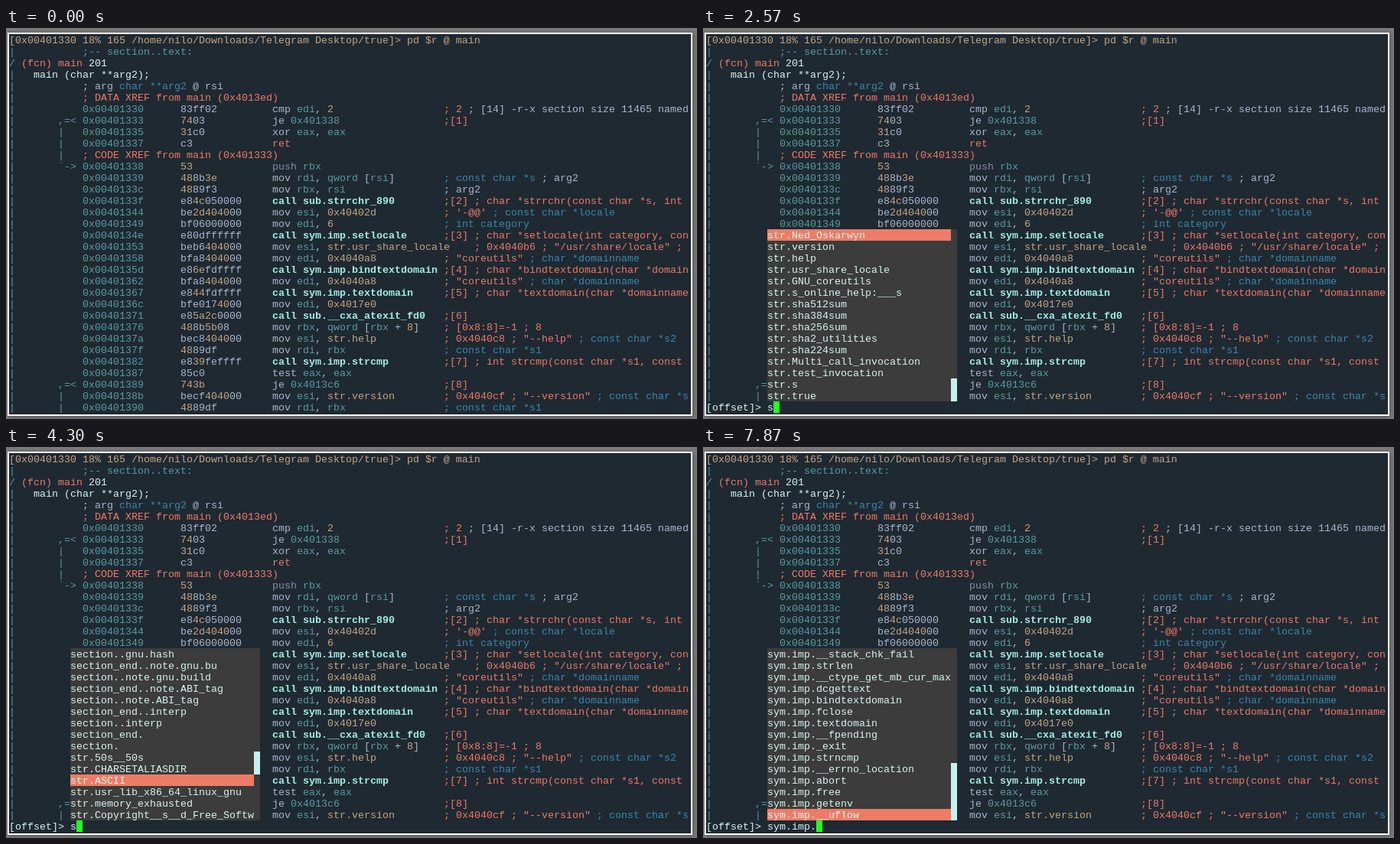
These frames come from a looping animation (903x511 px, 8000 ms). An HTML page with a canvas:

```html
<!DOCTYPE html>
<html lang="en">
<head>
<meta charset="utf-8">
<title>Disassembly with flag completion</title>
<style>
  html, body { margin: 0; width: 100%; height: 100%; overflow: hidden; background: #7b7b7b; }
  canvas { display: block; }
</style>
</head>
<body>
<canvas id="stage" width="903" height="511"></canvas>
<script>
const ctx = document.getElementById('stage').getContext('2d');
const LOOP = 8000, CELL = 8, LINE = 15, LEFT = 4, TOP = 8;
const FONT = '13.333px "Liberation Mono", monospace';
const BG = '#1f2932', POPUP = '#3c3c3c', SELECTED = '#ed7c66', PALE = '#c8f0ea';
const COLORS = {
  w: '#d8f6ef', g: '#a9b7cd', t: '#559c9e', r: '#ed7a66', b: '#3a87ad',
  n: '#c5a582', p: '#8a8aa6', c: '#a2eee2'
};
const colX = col => LEFT + col * CELL;
const rowY = row => TOP + row * LINE;

function fill(color, x, y, w, h) {
  ctx.fillStyle = color;
  ctx.fillRect(x, y, w, h);
}

// "^x" inside a string switches to colour x.
function write(col, row, text) {
  for (const part of text.split('^').slice(1)) {
    const run = part.slice(1);
    ctx.font = (part[0] === 'c' ? 'bold ' : '') + FONT;
    ctx.fillStyle = COLORS[part[0]];
    ctx.fillText(run, colX(col), rowY(row) + 12);
    col += run.length;
  }
}

const paintBytes = hex => hex.replace(/../g, b => {
  const v = parseInt(b, 16);
  return (v > 31 && v < 127 ? '^n' : '^g') + b;
});

function paintCode(code) {
  if (code.startsWith('call')) return '^c' + code;
  if (code === 'ret') return '^r' + code;
  const [op, ...args] = code.split(' ');
  const rest = args.join(' ');
  if (op === 'je') return '^g' + op + ' ^t' + rest;
  return (op === 'push' ? '^p' : '^g') + op + ' ' +
    rest.replace(/str\.\w+|0x\w+|\b\d+\b|[a-z]+|[^a-z0-9]+/g,
      m => (/^(str\.|\d)/.test(m) ? '^n' : /^[a-z]/.test(m) ? '^t' : '^g') + m);
}

const HEADER = [
  [0, '^n[0x00401330 18% 165 /home/nilo/Downloads/Telegram Desktop/true]> pd $r @ main'],
  [12, '^t;-- section..text:'],
  [2, '^r(fcn) main ^w201'],
  [4, '^wmain (char **arg2);'],
  [12, '^g; arg ^bchar **arg2 ^g@ rsi'],
  [12, '^r; DATA XREF from main (0x4013ed)']
];

// address | bytes | instruction | comment | jump gutter
const CODE = `
330|83ff02|cmp edi, 2|^r; 2 ^g; [14] -r-x section size 11465 named
333|7403|je 0x401338|^r;[1]|,=<
335|31c0|xor eax, eax||!
337|c3|ret||!
XREF
338|53|push rbx||\`->
339|488b3e|mov rdi, qword [rsi]|^b; const char *s ^g; arg2
33c|4889f3|mov rbx, rsi|^g; arg2
33f|e84c050000|call sub.strrchr_890|^r;[2] ; char *strrchr(const char *s, int
344|be2d404000|mov esi, 0x40402d|^r; '-@@' ^b; const char *locale
349|bf06000000|mov edi, 6|^b; int category
34e|e80dffffff|call sym.imp.setlocale|^r;[3] ; char *setlocale(int category, con
353|beb6404000|mov esi, str.usr_share_locale|^r     ; 0x4040b6 ; "/usr/share/locale" ;
358|bfa8404000|mov edi, 0x4040a8|^r; "coreutils" ^b; char *domainname
35d|e86efdffff|call sym.imp.bindtextdomain|^r;[4] ; char *bindtextdomain(char *domain
362|bfa8404000|mov edi, 0x4040a8|^r; "coreutils" ^b; char *domainname
367|e844fdffff|call sym.imp.textdomain|^r;[5] ; char *textdomain(char *domainname
36c|bfe0174000|mov edi, 0x4017e0|
371|e85a2c0000|call sub.__cxa_atexit_fd0|^r;[6]
376|488b5b08|mov rbx, qword [rbx + 8]|^r; [0x8:8]=-1 ; 8
37a|bec8404000|mov esi, str.help|^r; 0x4040c8 ; "--help" ^b; const char *s2
37f|4889df|mov rdi, rbx|^b; const char *s1
382|e839feffff|call sym.imp.strcmp|^r;[7] ; int strcmp(const char *s1, const
387|85c0|test eax, eax|
389|743b|je 0x4013c6|^r;[8]|,=<
38b|becf404000|mov esi, str.version|^r; 0x4040cf ; "--version" ^b; const char *s|!
390|4889df|mov rdi, rbx|^b; const char *s1|!`.trim().split('\n');

// Completion lists run upwards from the prompt.
const FLAGS = `true s test_invocation Multi_call_invocation sha224sum sha2_utilities
sha256sum sha384sum sha512sum s_online_help:___s GNU_coreutils usr_share_locale help version
Ned_Oskarwyn Full_documentation_at:___s or_available_locally_via:_ 8.25 write_error s:__s
A_NULL_argv_0__was_passed_ .libs l______l always shell_escape shell_escape_always c_maybe
clocale s___s___s s__s License_GPLv3__GNU_GPL_ver Written_by__s Written_by__s_and__s
Written_by__s___s__and__s Written_by__s___s___s____s Written_by__s___s___s____s
Written_by__s___s___s____s General_help_using_GNU_sof Copyright__s__d_Free_Softw
memory_exhausted usr_lib_x86_64_linux_gnu ASCII CHARSETALIASDIR 50s__50s`
  .split(/\s+/).map(s => 'str.' + s)
  .concat(`section. section_end. section..interp section_end..interp section..note.ABI_tag
section_end..note.ABI_tag section..note.gnu.build section_end..note.gnu.bu section..gnu.hash
section_end..gnu.hash`.split(/\s+/));
const IMPORTS = `__uflow getenv free abort __errno_location strncmp _exit __fpending textdomain
fclose bindtextdomain dcgettext __ctype_get_mb_cur_max strlen __stack_chk_fail`
  .split(/\s+/).map(s => 'sym.imp.' + s);

const VISIBLE = 15, FLAG_COUNT = 140, HIGHEST = 52;
const TYPED = 'sym.imp.';
const KEY_TIMES = [2030, 6530, 6800, 7130, 7370, 7400, 7570, 7870];
// Moments at which the list repaints while an arrow key is held.
const REPAINTS = [
  2170, 2230, 2270, 2330, 2370, 2430, 2470, 2530, 2570, 2600, 2670, 2730, 2770, 2830, 2870, 2930,
  3000, 3030, 3170, 3230, 3270, 3300, 3370, 3400, 3430, 3500, 3570, 3630,
  4000, 4070, 4170, 4270, 4370, 4430, 4530, 4630, 4730, 4800, 4900, 4970, 5070, 5130, 5270, 5330, 5400
];
const SCROLL = [[2030, 0], [2169, 0], [2170, 1], [2570, 14], [3500, 48], [3630, HIGHEST],
  [3999, HIGHEST], [4000, 51], [4970, 15], [5400, 0]];

function selectionAt(t) {
  const shown = REPAINTS.filter(r => r <= t).pop() || 2030;
  const i = SCROLL.findIndex(([time]) => time >= shown);
  if (i < 1) return 0;
  const [t0, a] = SCROLL[i - 1], [t1, b] = SCROLL[i];
  return Math.round(a + (b - a) * (shown - t0) / (t1 - t0));
}

function drawWindow() {
  fill('#7b7b7b', 0, 0, 903, 511);
  ctx.save();
  ctx.shadowColor = 'rgba(0, 0, 0, 0.35)';
  ctx.shadowBlur = 6;
  ctx.shadowOffsetX = ctx.shadowOffsetY = 1;
  fill('#fff', 2, 6, 895, 501);
  ctx.restore();
  fill(BG, 4, 8, 891, 497);
}

function drawListing() {
  HEADER.forEach(([col, text], row) => {
    if (row) write(0, row, row === 2 ? '^t/' : '^t|');
    write(col, row, text);
  });
  CODE.forEach((line, i) => {
    const row = i + HEADER.length;
    write(0, row, '^t|');
    if (line === 'XREF') {
      write(8, row, '^t|   ^r; CODE XREF from main (0x401333)');
      return;
    }
    const [addr, hex, code, note, gutter = ''] = line.split('|');
    write(8, row, '^t' + gutter.replace('!', '|'));
    write(12, row, '^t0x00401' + addr);
    write(28, row, paintBytes(hex));
    write(43, row, paintCode(code));
    write(71, row, note);
  });
}

function drawPopup(items, first, selected, thumbRow, thumbRows) {
  const bottom = rowY(32);
  fill(POPUP, colX(10), rowY(17), 31 * CELL, VISIBLE * LINE);
  for (let i = 0; i < VISIBLE; i++) {
    const row = 31 - i;
    if (first + i === selected) fill(SELECTED, colX(10), rowY(row), 30 * CELL, LINE);
    write(10, row, '^w' + items[first + i].slice(0, 30));
  }
  fill(PALE, colX(40), bottom - (thumbRow + thumbRows) * LINE, CELL, thumbRows * LINE);
}

function draw(t) {
  drawWindow();
  drawListing();
  if (t < 600) return;

  const typed = TYPED.slice(0, KEY_TIMES.filter(k => k <= t).length);
  fill(BG, LEFT, rowY(32), 891, LINE);
  write(0, 32, '^w[offset]> ' + typed);
  fill('#22ff22', colX(10 + typed.length), rowY(32), CELL, LINE);

  if (typed.length > 1) {
    drawPopup(IMPORTS, 0, 0, 0, 5);
  } else if (typed) {
    const selected = selectionAt(t);
    const first = t < 4000 ? Math.max(0, selected - VISIBLE + 1)
                           : Math.min(HIGHEST - VISIBLE + 1, selected);
    drawPopup(FLAGS, first, selected, Math.floor(VISIBLE * first / FLAG_COUNT), 2);
  }
}

function tick(now) {
  draw(now % LOOP);
  requestAnimationFrame(tick);
}
draw(0);
requestAnimationFrame(tick);
</script>
</body>
</html>
```
